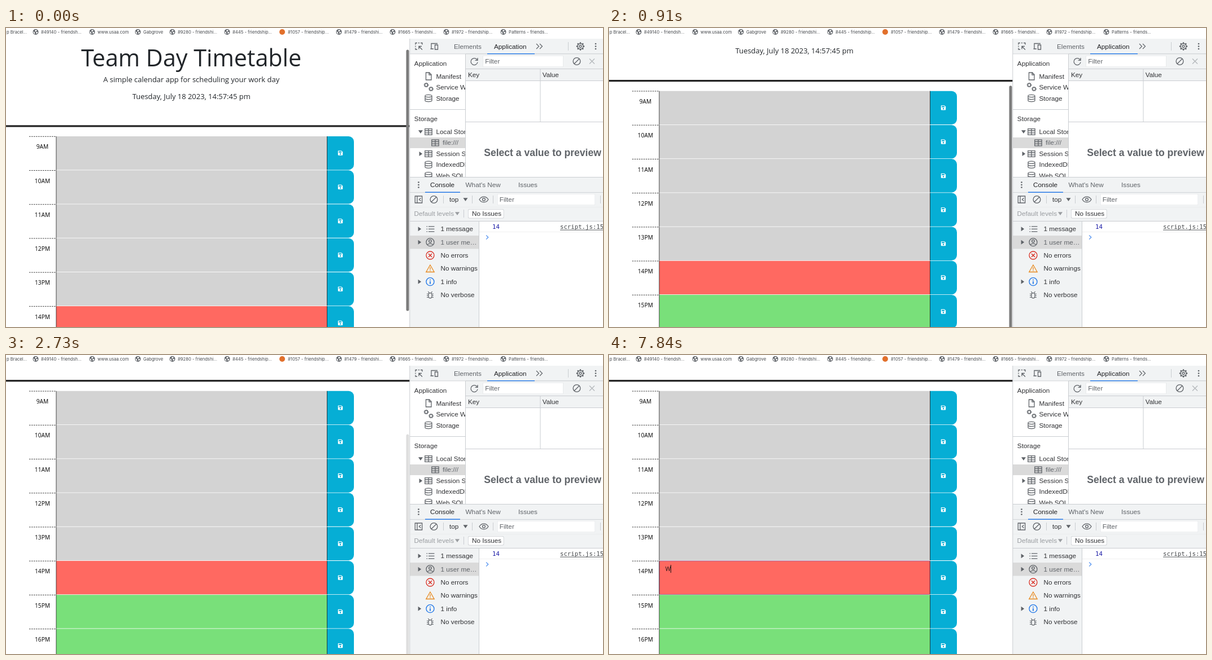
An HTML page with a canvas for the animation above (8 s loop, 1057 by 530 pixels).

```html
<!DOCTYPE html>
<html lang="en">
<head>
<meta charset="utf-8">
<title>Day planner demo</title>
<style>
html, body { margin: 0; width: 100%; height: 100%; overflow: hidden; background: #fff; }
canvas { display: block; width: 1057px; height: 530px; }
</style>
</head>
<body>
<canvas id="stage"></canvas>
<script>
const W = 1057, H = 530, LOOP = 8000, STEP = 70;
const canvas = document.getElementById('stage');
const ratio = window.devicePixelRatio || 1;
canvas.width = W * ratio;
canvas.height = H * ratio;
const c = canvas.getContext('2d');

const UI = '"Liberation Sans", Arial, sans-serif';
const PAGE = '"Open Sans", "Noto Sans", sans-serif';
const CODE = '"DejaVu Sans Mono", monospace';
const BAR = '#f1f3f4', EDGE = '#cacdd1', GREY = '#5f6368', INK = '#303134', BLUE = '#1a73e8';

// [time, scroll offset]
const SCROLL = [[0, 0], [70, 3], [210, 15], [560, 50], [840, 75], [1050, 91], [1260, 104],
  [1470, 107.5], [1820, 107.5], [1890, 111], [2100, 129.5], [2170, 130], [2240, 130], [2380, 128.2]];

function scrollAt(t) {
  for (let i = 1; i < SCROLL.length; i++) {
    const [t0, a] = SCROLL[i - 1], [t1, b] = SCROLL[i];
    if (t < t1) return a + (b - a) * (t - t0) / (t1 - t0);
  }
  return SCROLL[SCROLL.length - 1][1];
}

function rect(x, y, w, h, color) {
  c.fillStyle = color;
  c.fillRect(x, y, w, h);
}

function text(s, x, y, color = INK, size = 11.75, font = UI, align = 'left', weight = '') {
  c.font = `${weight} ${size}px ${font}`;
  c.textAlign = align;
  c.fillStyle = color;
  c.fillText(s, x, y);
}

function stroke(path, color = GREY, width = 1.3) {
  c.strokeStyle = color;
  c.lineWidth = width;
  c.stroke(path);
}

function icon(x, y, d, color = GREY, width = 1.3) {
  c.save();
  c.translate(x, y);
  stroke(new Path2D(d), color, width);
  c.restore();
}

function shape(x, y, d, color = GREY) {
  c.save();
  c.translate(x, y);
  c.fillStyle = color;
  c.fill(new Path2D(d));
  c.restore();
}

function disc(x, y, r, color = GREY) {
  c.fillStyle = color;
  c.beginPath();
  c.arc(x, y, r, 0, 7);
  c.fill();
}

function ring(x, y, r, color = GREY, width = 1.3) {
  const p = new Path2D();
  p.arc(x, y, r, 0, 7);
  stroke(p, color, width);
}

function round(x, y, w, h, r, color) {
  c.fillStyle = color;
  c.beginPath();
  c.roundRect(x, y, w, h, r);
  c.fill();
}

function frameBox(x, y, w, h, color, width) {
  const p = new Path2D();
  p.roundRect(x, y, w, h, 1.5);
  stroke(p, color, width);
}

function clip(x, y, w, h, paint) {
  c.save();
  c.beginPath();
  c.rect(x, y, w, h);
  c.clip();
  paint();
  c.restore();
}

const ICON = {
  file: 'M-4.5-6.5H1.5L5-3V6.5H-4.5ZM1-6.5V-2.5H5',
  grid: 'M-6.2-5.4H6.2V5.4H-6.2ZM-6.2-2H6.2M-6.2 1.8H6.2M0-5.4V5.4',
  drum: 'M-6-4C-6-6.8 6-6.8 6-4S-6-1.2-6-4V4C-6 6.8 6 6.8 6 4V-4M-6 0C-6 2.8 6 2.8 6 0',
  right: 'M-2.4-4L3.2 0L-2.4 4Z',
  down: 'M-4-2.8H4L0 3Z',
  warn: 'M0-6.5L7.2 6H-7.2ZM0-2.5V2M0 3V4.5',
  list: 'M-3.5-4.5H7M-3.5 0H7M-3.5 4.5H7M-7-4.5H-5.3M-7 0H-5.3M-7 4.5H-5.3',
  bug: 'M-3 0C-3-4.5 3-4.5 3 0V2.5C3 7 -3 7-3 2.5ZM-2-3.5L-3.5-6M2-3.5L3.5-6M-6-1.5H-3M3-1.5H6M-6 1.5H-3M3 1.5H6M-6 4.5H-3M3 4.5H6',
  inspect: 'M-3 5.5H-6V3M-6 1V-1M-6-3V-6H-3M-1-6H1M3-6H6V-3M0 0L6 6M0 5V0H5',
  device: 'M-6.5 4.5H-1M-5 4V-5H6M1.5-2.5H6.5V5.5H1.5Z',
  reload: 'M5.5-2A6 6 0 1 0 6 1.5M6-6V-1.6H1.6',
  panel: 'M-6.2-6H6.2V6H-6.2ZM-2.5-6V6M4-2.8L1 0L4 2.8',
  eye: 'M-8 0C-4-6.5 4-6.5 8 0C4 6.5-4 6.5-8 0Z'
};

function globe(x) {
  disc(x, 7, 5);
  shape(x, 7, 'M-4-1.3L-1.6.8L-1.2 3.8C-3.2 3.4-4.2 1-4-1.3ZM-.4-3.8L2.4-3.1L1.6-1.2L-.6-.6L-1.5-1.8ZM.2.7L3-.2L3.9 1L1.6 3.6Z', '#fff');
}

function bookmarks() {
  rect(0, 0, W, 19, '#fff');
  const items = [[62, '#49140 - friendsh...'], [162, 'www.usaa.com'], [243, 'Gabgrove'],
    [304, '#9280 - friendshi...'], [401, '#445 - friendship...'], [499, '#1057 - friendship...'],
    [599, '#1479 - friendshi...'], [694, '#1665 - friendshi...'], [789, '#1972 - friendship...'],
    [890, 'Patterns - friends...']];
  const label = (s, x) => text(s, x, 9.8, '#45484c', 7.65, 'Inter, sans-serif');
  label('p Bracel...', 1);
  items.forEach(([x, s], i) => {
    if (i === 5) disc(x - 10, 7, 5, '#e2702c');
    else globe(x - 9.5);
    label(s, x);
  });
}

function saveIcon(x, y) {
  shape(x, y, 'M-4-4H2L4.2-1.8V3.2Q4.2 4.2 3.2 4.2H-3.2Q-4.2 4.2-4.2 3.2V-3.2Z', '#fff');
  rect(x - 2.9, y - 2.9, 4.9, 2.2, '#06aed5');
  disc(x, y + 1.7, 1.25, '#06aed5');
}

function hourRow(i, y, focused, typed, caret) {
  const hour = 9 + i;
  text(hour + (hour < 12 ? 'AM' : 'PM'), 64.5, y + 22.4, '#000', 10.2, PAGE, 'center');
  c.setLineDash([2.6, 1.4]);
  icon(41, y + 0.3, 'M0 0H48', '#111', 0.8);
  c.setLineDash([]);
  rect(89, y, 479.5, 59.4, hour < 14 ? '#d3d3d3' : hour === 14 ? '#ff6961' : '#79e07a');
  round(568.5, y, 47.5, 59.4, [0, 9.5, 9.5, 0], '#06aed5');
  saveIcon(592, y + 29.6);
  if (focused) {
    frameBox(88.3, y - 0.6, 480.6, 60.8, '#fff', 0.7);
    frameBox(89, y + 0.1, 479.2, 59.4, '#8a3f90', 0.7);
    if (typed) text('W', 99.8, y + 17.9, '#1c1010', 10.2, PAGE);
    if (caret) rect(typed ? 109 : 100, Math.round(y) + 7, 1, 14, '#111');
  }
  rect(88.6, y, 0.7, 60.2, '#000');
  rect(568.1, y, 0.7, 59.4, '#000');
}

function page(t) {
  const top = -scrollAt(t);
  const focused = t >= 6580, typed = t >= 7770, caret = t < 7140 || t >= 7630;
  rect(0, 19, 715, 511, '#fff');
  text('Team Day Timetable', 328, top + 67.8, '#212529', 41.2, PAGE, 'center');
  text('A simple calendar app for scheduling your work day', 328.2, top + 95.7, '#212529', 12.95, PAGE, 'center');
  text('Tuesday, July 18 2023, 14:57:45 pm', 328.2, top + 125.6, '#212529', 12.95, PAGE, 'center');
  rect(0, top + 172.3, 715, 3.2, '#222');
  for (let i = 0; i < 9; i++) hourRow(i, top + 192 + i * 60.22, focused && i === 5, typed, caret);
  // the scrollbar fades out once the page rests
  c.globalAlpha = Math.max(0, Math.min(1, (2800 - t) / 280));
  round(708.5, 38.5 - top * 0.795, 5, 463, 2.5, '#7c7c7c');
  c.globalAlpha = 1;
}

function dots(x, y) {
  for (const d of [-4.5, 0, 4.5]) disc(x, y + d, 1.35);
}

function block(x, y) {
  ring(x, y, 6.4);
  icon(x, y, 'M-4.5 4.5L4.5-4.5');
}

function gear(x, y) {
  for (let i = 0; i < 8; i++) {
    const a = i * Math.PI / 4, p = new Path2D();
    p.moveTo(x + 5 * Math.cos(a), y + 5 * Math.sin(a));
    p.lineTo(x + 7.2 * Math.cos(a), y + 7.2 * Math.sin(a));
    stroke(p, GREY, 2.4);
  }
  ring(x, y, 5);
  ring(x, y, 2);
}

function toolbar() {
  rect(715, 19, 342, 27, BAR);
  rect(715, 45.5, 342, 0.8, EDGE);
  icon(731, 32.5, ICON.inspect);
  icon(758, 32.5, ICON.device);
  text('Elements', 793, 36.5, GREY);
  text('Application', 864, 36.5, '#202124');
  icon(944, 32.5, 'M-5-4.5L-.5 0L-5 4.5M1-4.5L5.5 0L1 4.5', GREY, 1.2);
  rect(995, 25, 1, 15, EDGE);
  gear(1017, 32.5);
  dots(1044, 32.5);
}

function storageTree() {
  text('Application', 722.8, 66.8);
  icon(748, 85.5, ICON.file);
  text('Manifest', 761.5, 89.8);
  for (const [x, y] of [[744, 101], [752.5, 108]]) {
    ring(x, y, 2.6);
    c.setLineDash([1.4, 1.3]);
    ring(x, y, 3.7, GREY, 1.2);
    c.setLineDash([]);
  }
  text('Service Workers', 761.5, 109);
  icon(748, 124.5, ICON.drum);
  text('Storage', 761.5, 128.8);
  rect(715, 144, 98, 1, EDGE);
  text('Storage', 722.8, 165.2);
  rect(715, 194, 98, 19, '#dadada');
  shape(734, 184, ICON.down);
  icon(748, 184, ICON.grid);
  text('Local Storage', 761.5, 188);
  icon(760, 203.5, ICON.grid);
  text('file:///', 773, 207.3, GREY);
  shape(734, 223, ICON.right);
  icon(748, 223, ICON.grid);
  text('Session Storage', 761.5, 227);
  icon(748, 242.3, ICON.drum);
  text('IndexedDB', 761.5, 246.3);
  icon(748, 261.8, ICON.drum);
  text('Web SQL', 761.5, 265.8);
}

function inputBox(x, y, w) {
  rect(x, y, w, 20, '#dfe1e4');
  rect(x + 0.5, y + 0.5, w - 1, 19, '#fff');
  text('Filter', x + 3.7, y + 14.2, GREY);
}

function storageView() {
  rect(814, 46, 243, 47, BAR);
  rect(814, 45.5, 243, 0.8, EDGE);
  rect(852, 45, 84, 1.3, BLUE);
  icon(829, 59, ICON.reload);
  inputBox(844.5, 49, 142);
  block(1010.5, 59);
  icon(1037.5, 59, 'M-4.5-4.5L4.5 4.5M-4.5 4.5L4.5-4.5', '#b5b8bb');
  rect(814, 72, 243, 1, EDGE);
  text('Key', 818, 87.2);
  text('Value', 949.7, 87.2);
  rect(814, 93, 243, 1, EDGE);
  rect(945.5, 72, 1, 94, EDGE);
  rect(814, 166, 243, 1, EDGE);
  text('Select a value to preview', 846.3, 227.3, GREY, 17.55, UI, 'left', 'bold');
  rect(813, 46, 1, 219, EDGE);
}

function drawer() {
  rect(715, 264, 342, 79, BAR);
  rect(715, 264, 342, 1, EDGE);
  dots(730.5, 278);
  text('Console', 751, 282, '#202124');
  text("What's New", 813.5, 282, GREY);
  text('Issues', 907, 282, GREY);
  rect(715, 291, 342, 0.8, EDGE);
  rect(742, 290.5, 62, 1.4, BLUE);
  icon(730.5, 304, ICON.panel);
  block(757.5, 304);
  text('top', 785, 308);
  shape(813.5, 304, ICON.down);
  icon(846, 304, ICON.eye);
  ring(846, 304, 2.4);
  for (const x of [774, 825, 862, 1052]) rect(x, 297, 1, 14, EDGE);
  inputBox(870, 294, 173);
  rect(715, 317, 342, 0.6, '#e8eaec');
  text('Default levels', 722.5, 333, '#9a9da1');
  shape(799, 329, ICON.down, '#9a9da1');
  rect(810, 322, 1, 14, EDGE);
  round(818, 321, 63.5, 16.5, 2.5, EDGE);
  round(818.7, 321.7, 62.1, 15.1, 2, '#fff');
  text('No Issues', 825, 333);
  rect(715, 342, 342, 1, EDGE);
}

function consolePanel() {
  rect(715, 343, 122, 187, BAR);
  rect(715, 368, 122, 23.5, '#dadada');
  rect(837, 343, 1, 187, EDGE);
  const rows = ['1 message', '1 user me…', 'No errors', 'No warnings', '1 info', 'No verbose'];
  rows.forEach((s, i) => {
    const y = 356.3 + i * 23.35;
    if (i < 2 || i === 4) shape(732, y, ICON.right);
    text(s, 769.5, y + 4.1, i === 1 ? GREY : INK);
  });
  icon(751.5, 356.3, ICON.list);
  ring(751, 379.7, 7);
  ring(751, 377.7, 2.3);
  icon(751, 379.7, 'M-4.8 4.6C-3 1.6 3 1.6 4.8 4.6');
  ring(751, 403, 7, '#d93025');
  icon(751, 403, 'M-3-3L3 3M-3 3L3-3', '#d93025', 1.5);
  icon(751, 426.5, ICON.warn, '#e8881c');
  ring(751, 449.7, 7, BLUE);
  icon(751, 449.7, 'M0-4V-2.2M0-.8V4', BLUE, 1.7);
  icon(751, 473, ICON.bug, GREY, 1.2);
  text('14', 861, 356.3, '#1a1aa6', 10.7, CODE);
  text('script.js:15', 981, 356.3, '#45484b', 10.7, CODE);
  rect(981, 357.6, 76, 0.9, '#45484b');
  rect(838, 361, 219, 1, '#f0f0f0');
  icon(852, 371, 'M-1.8-3.6L1.8 0L-1.8 3.6', '#4a8df0', 1.2);
}

function devtools() {
  rect(715, 19, 342, 511, '#fff');
  toolbar();
  clip(715, 46, 98, 218, storageTree);
  storageView();
  drawer();
  consolePanel();
  rect(714.3, 19, 1, 511, EDGE);
}

function draw(t) {
  c.setTransform(ratio, 0, 0, ratio, 0, 0);
  rect(0, 0, W, H, '#fff');
  clip(0, 19, 715, 511, () => page(t));
  devtools();
  bookmarks();
}

const start = performance.now();
let shown = -1;

function frame() {
  const t = (performance.now() - start) % LOOP;
  const step = Math.floor(t / STEP) * STEP;
  if (step !== shown) draw(shown = step);
  requestAnimationFrame(frame);
}
frame();
</script>
</body>
</html>
```
